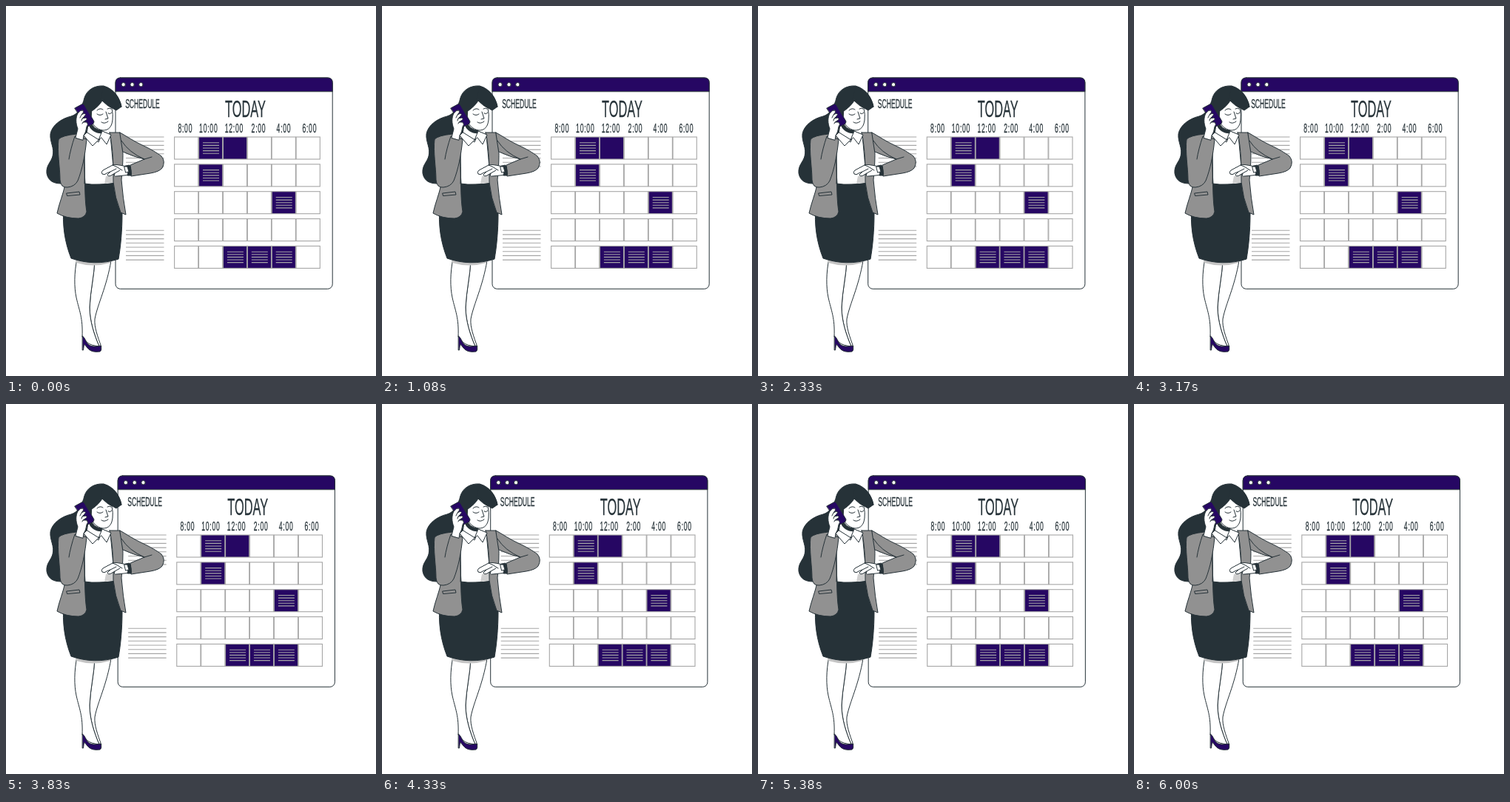
An HTML page for the animation above (6.04 s loop, 500 by 500 pixels).

```html
<!DOCTYPE html>
<html lang="en">
<head>
<meta charset="utf-8">
<title>Schedule</title>
<style>
  html, body { margin: 0; width: 100%; height: 100%; overflow: hidden; background: #fff; }
  svg { display: block; width: 100vw; height: 100vh; }
  text { font-family: "Liberation Sans", Arial, sans-serif; fill: #263238; stroke: #263238; stroke-width: .3; }
  .ink { fill: none; stroke: #263238; stroke-width: 1; stroke-linecap: round; stroke-linejoin: round; }
  .ink .white { fill: #fff; }
  .ink .gray { fill: #919191; }
  .ink .dark { fill: #263238; }
  .ink .purple { fill: #260763; }
  .rule { fill: none; stroke: #a6a6a6; stroke-width: 1.1; }
</style>
</head>
<body>
<svg viewBox="0 0 500 500">
  <g id="board">
    <g class="ink">
      <rect class="white" x="148" y="97" width="293.2" height="285.3" rx="6.5"/>
      <path class="purple" d="M148 115.300V103.500Q148 97 154.500 97H434.700Q441.200 97 441.200 103.500V115.300Z"/>
      <circle class="white" cx="158.7" cy="106.2" r="2.7"/>
      <circle class="white" cx="170.6" cy="106.2" r="2.7"/>
      <circle class="white" cx="182.4" cy="106.2" r="2.7"/>
    </g>
    <g id="grid" class="rule"></g>
    <g id="labels"></g>
  </g>

  <g class="ink">
    <!-- legs and shoe -->
    <path class="white" d="M120 344C119 365 114 385 113 407C113 425 119 444 126 460L129 461C124 447 119 434 120 423C124 402 136 380 142 344Z"/>
    <path class="white" d="M96 341C92 361 92 380 95 394C99 412 104 421 103 447L109 454C113 458 119 459 126 460C119 444 113 425 113 407C114 385 119 365 120 344Z"/>
    <path d="M94 342L142 343L141 347Q118 354 95 347Z" fill="#c4c4c4" stroke="none"/>
    <path class="purple" d="M103.500 446C107 448 108 455 112 458C117 461 123 460 128 459Q130 465 127 467C120 468 114 467 110 462Q107 458 105.500 457L104.500 465H103.500Z"/>

    <!-- hair -->
    <path class="dark" d="M156 136C154 124 146 112 132 108C119 107 109 114 106 124C103 136 98 146 88 149C75 152 62 161 60 173C59 184 66 192 63 203C61 211 54 215 55 226C57 237 65 240 75 240L105 205L120 174L126 140Z"/>

    <!-- neck and face -->
    <path class="white" d="M112 153L109 173L126 187L131 174L128 160Z"/>
    <path class="dark" d="M115 157Q118 167 129 168L129 172Q115 171 112 160Z"/>
    <path class="white" d="M116 142C122 138 127 133 130 128Q137 135 143 138Q145 147 144 154C143 163 139 168 131 168C123 167 117 161 115 154Z"/>
    <path class="dark" d="M127 128Q132 126 134 127Q140 137 149 141L156 136C153 123 144 112 132 109Z"/>
    <path d="M123 146Q127 149 131 146M138 145Q141 147 143 144M123 141Q127 137 131 140M137 139Q140 137 142 139M135 143L138 152L134 153M129 157Q133 160 138 156"/>

    <!-- blouse -->
    <path class="white" d="M109 172L125 184L131 170L141 174L147 240L107 242L104 180Z"/>
    <path d="M135 230L146 227L147 239L133 240Z" fill="#cfcfcf" stroke="none"/>

    <!-- skirt -->
    <path class="dark" d="M106 240Q126 243 148 239C154 253 157 266 157 281C157 303 155 325 152 342C130 349 108 348 88 341C79 318 76 296 78 270Z"/>

    <!-- jacket -->
    <path class="gray" d="M140 171L154 171C160 188 158 214 156 235Q158 260 162 282L155 279Q147 259 145 238C145 216 145 194 140 171Z"/>
    <path class="gray" d="M109 173L95 173Q76 175 71 180C69 200 75 223 80 241C77 255 72 266 69 280Q81 287 98 287Q107 286 109 278C106 259 107 237 106 218Q105 195 109 173Z"/>
    <path d="M82 253L99 251L100 255L83 256.500ZM106 240Q107 215 105 196"/>

    <!-- arm on the phone -->
    <path class="gray" d="M71 180C69 198 73 218 73 235Q74 246 83 245Q93 244 97 236C103 221 107 201 109 180L93 176Q87 194 85 207"/>
    <path class="purple" d="M93 138L103 132.500Q105 132 106 134L119 156Q119 158 117 160L110 163Z"/>
    <path class="white" d="M94 178L97 166C94 158 94 151 97 145Q101 140 104 141Q106 143 102 147L106 145Q109 146 106 149L103 152L108 151Q111 153 107 155L104 157L109 157Q112 160 109 163Q108 171 105 175L104 181Z"/>
    <path d="M102 147L100 151M103 152L102 155M104 157L103 159"/>

    <!-- collar -->
    <path class="white" d="M109 171L105 175L117 189L125 181Z"/>
    <path class="white" d="M125 181L130 169L142 174L136 187L129 178Z"/>

    <!-- arm with the watch -->
    <path class="gray" d="M154 171C163 176 173 183 184 188S205 199 210 203Q216 210 211 219Q207 224 195 226L169 230L168 215L187 207Q173 204 158 197Z"/>
    <path d="M156 182Q166 198 187 207M187 207L197 204"/>
    <path class="white" d="M168 217C158 217 150 213 144 215L131 222Q128 224 130 227Q133 229 136 226L141 224L137 228Q138 231 142 229L147 226Q145 231 149 230Q159 229 169 228Z"/>
    <path d="M141 224L149 220M147 226L154 222M144 215L149 217L157 222"/>
    <path class="dark" d="M162 216L167 215Q170 222 169 229L164 229Q166 222 162 216Z"/>
    <path class="white" d="M160 217L164 217L166 224L162 225Z"/>
  </g>
</svg>

<script>
const NS = "http://www.w3.org/2000/svg";
const board = document.getElementById("board");
const grid = document.getElementById("grid");
const labels = document.getElementById("labels");

function add(parent, tag, attrs, content = "") {
  const node = document.createElementNS(NS, tag);
  for (const name in attrs) node.setAttribute(name, attrs[name]);
  node.textContent = content;
  parent.append(node);
}

function lines(x, y, width, count, pitch) {
  let d = "";
  for (let i = 0; i < count; i++) d += `M${x} ${y + i * pitch}h${width}`;
  add(grid, "path", { d });
}

// One condensed face is shared by all lettering.
function label(content, x, y, size, spacing = 0) {
  add(labels, "text", {
    transform: `translate(${x} ${y}) scale(.52 1)`,
    "font-size": size, "letter-spacing": spacing, "text-anchor": "middle"
  }, content);
}

const booked = ["01", "02", "11", "24", "42", "43", "44"];
for (let row = 0; row < 5; row++) {
  for (let col = 0; col < 6; col++) {
    const x = 227.6 + col * 32.9, y = 177 + row * 36.85;
    const key = `${row}${col}`, full = booked.includes(key);
    add(grid, "rect", { x, y, width: 32.2, height: 30, fill: full ? "#260763" : "#fff" });
    if (full && key !== "02") lines(x + 5.5, y + 7.8, 22, 5, 3.6);
  }
}
lines(162, 177, 51.5, 8, 5.7);
lines(162, 303.2, 51.5, 8, 5.7);

label("SCHEDULE", 184.5, 137.8, 16.5);
label("TODAY", 323.5, 150.2, 31.5);
["8:00", "10:00", "12:00", "2:00", "4:00", "6:00"].forEach((hour, i) =>
  label(hour, [242.3, 273.8, 308.4, 341.5, 375.5, 410.3][i], 171.2, 16.5, 1.5));

const LOOP = 6040, STEP = 650;
const sway = [0, -1, 2, -4, 4, -4, 4, -4, 2, -1, 0];
const start = performance.now();

function draw(time) {
  const pos = time % LOOP / STEP, i = Math.floor(pos);
  const x = sway[i] + (sway[i + 1] - sway[i]) * (pos - i);
  board.setAttribute("transform", `translate(${x} 0)`);
}

function tick() {
  draw(performance.now() - start);
  requestAnimationFrame(tick);
}
tick();
</script>
</body>
</html>
```
